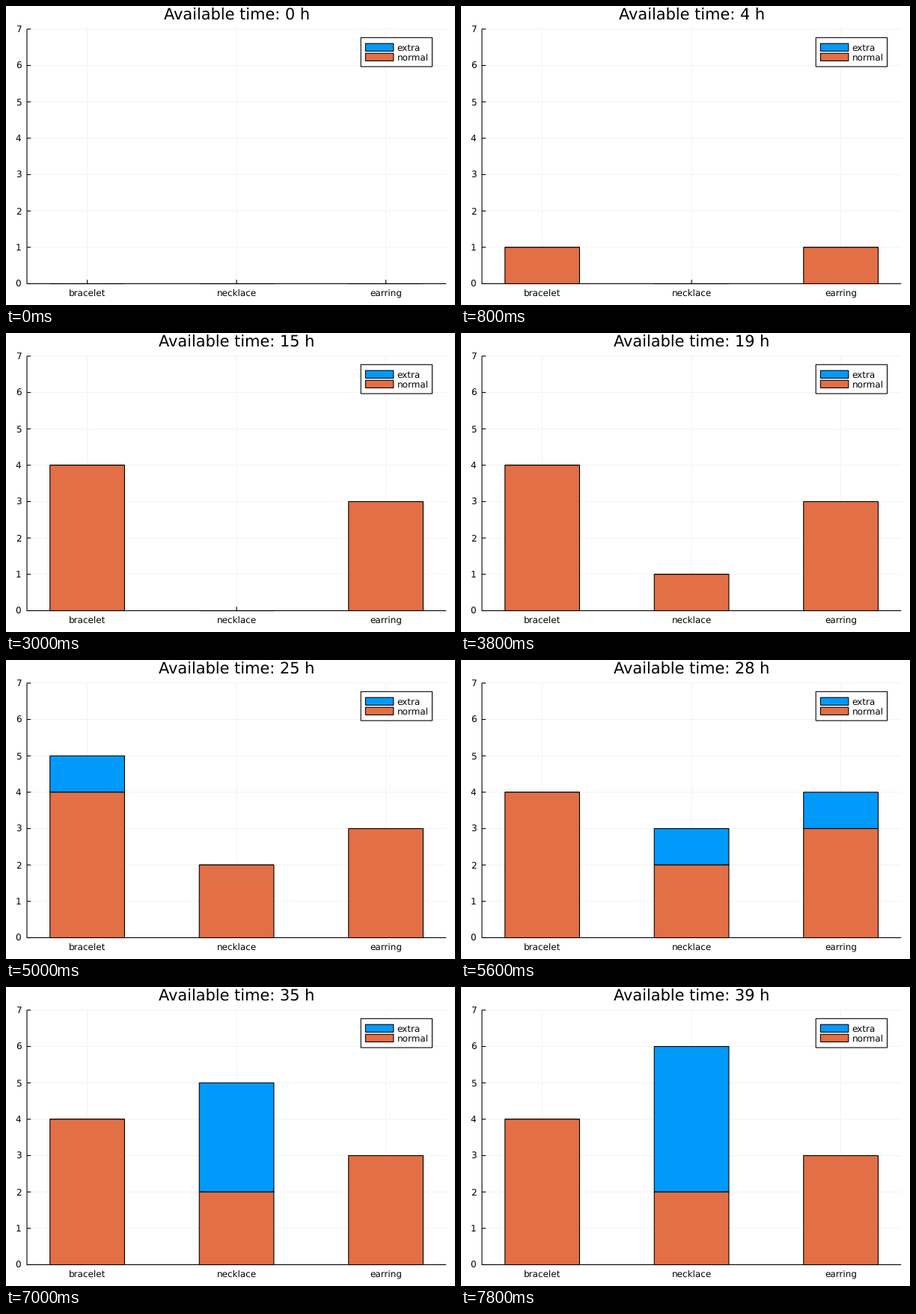
A matplotlib script for the animation above (8 s loop, 600 by 400 pixels).

```python
from itertools import product

import matplotlib.pyplot as plt
from matplotlib.animation import FuncAnimation
from matplotlib.patches import Rectangle

plt.rcParams["font.family"] = "DejaVu Sans"
plt.rcParams["text.hinting"] = "none"

W, H, DPI = 600, 400, 100
PX = 72 / DPI
LEFT, RIGHT, TOP, BASE = 28.0, 588.2, 30.9, 371.5
UNIT = (BASE - TOP) / 7
CENTERS = [108.6, 308.1, 507.6]
BAR_W = 99.7
BLUE, ORANGE = "#009AFA", "#E26F46"
LINE = 1.1 * PX

# name, hours per piece, normal demand, normal profit, extra profit
ITEMS = [
    ("bracelet", 2.5, 4, 90, 34),
    ("necklace", 4.0, 2, 100, 70),
    ("earring", 1.5, 3, 40, 16),
]


def hours(plan):
    return sum(k * item[1] for k, item in zip(plan, ITEMS))


def profit(plan):
    return sum(min(k, cap) * full + max(k - cap, 0) * extra
               for k, (_, _, cap, full, extra) in zip(plan, ITEMS))


PLANS = sorted(product(range(7), repeat=3), key=profit, reverse=True)


def best_plan(limit):
    return next(p for p in PLANS if hours(p) <= limit)


fig = plt.figure(figsize=(W / DPI, H / DPI), dpi=DPI, facecolor="white")
ax = fig.add_axes([0, 0, 1, 1])
ax.set_xlim(0, W)
ax.set_ylim(H, 0)
ax.axis("off")


def line(x0, y0, x1, y1, z, color="black", width=LINE):
    ax.plot([x0, x1], [y0, y1], color=color, lw=width, zorder=z,
            solid_capstyle="butt", snap=False)


def box(x, y, w, h, color, z):
    patch = Rectangle((x, y), w, h, facecolor=color, edgecolor="black",
                      lw=LINE, zorder=z, snap=False, joinstyle="miter")
    return ax.add_patch(patch)


def label(x, y, text, size=12, ha="center", z=8):
    return ax.text(x, y, text, fontsize=size * PX, ha=ha, va="baseline", zorder=z)


for n in range(8):
    y = BASE - n * UNIT
    line(LEFT, y, RIGHT, y, 1, "#EFEFEF", 0.8 * PX)
    line(LEFT, y, LEFT + 5.2, y, 3)
    label(20.3, y + 4.4, str(n), ha="right")
for x, item in zip(CENTERS, ITEMS):
    line(x, TOP, x, BASE, 1, "#EFEFEF", 0.8 * PX)
    line(x, BASE, x, BASE - 5.2, 3)
    label(x, 387.5, item[0])
line(LEFT, TOP, LEFT, BASE + 0.5, 3)
line(LEFT, BASE, RIGHT, BASE, 3)

box(474.2, 42.3, 95.3, 38.8, "white", 6)
for y, color, name in [(50.2, BLUE, "extra"), (63.2, ORANGE, "normal")]:
    box(480.4, y, 37.4, 10.2, color, 7)
    label(522.8, y + 9.7, name, ha="left")

title = label(308.6, 18.3, "", 20.9)
extras = [box(x - BAR_W / 2, BASE, BAR_W, 0, BLUE, 4) for x in CENTERS]
normals = [box(x - BAR_W / 2, BASE, BAR_W, 0, ORANGE, 5) for x in CENTERS]


def draw(hour):
    title.set_text(f"Available time: {hour} h")
    for k, item, extra, normal in zip(best_plan(hour), ITEMS, extras, normals):
        low = min(k, item[2])
        normal.set_height(-low * UNIT)
        extra.set_y(BASE - low * UNIT)
        extra.set_height(-(k - low) * UNIT)
    return [title, *extras, *normals]


anim = FuncAnimation(fig, draw, frames=40, interval=200, repeat=True,
                     repeat_delay=0, blit=False)
plt.show()
```
